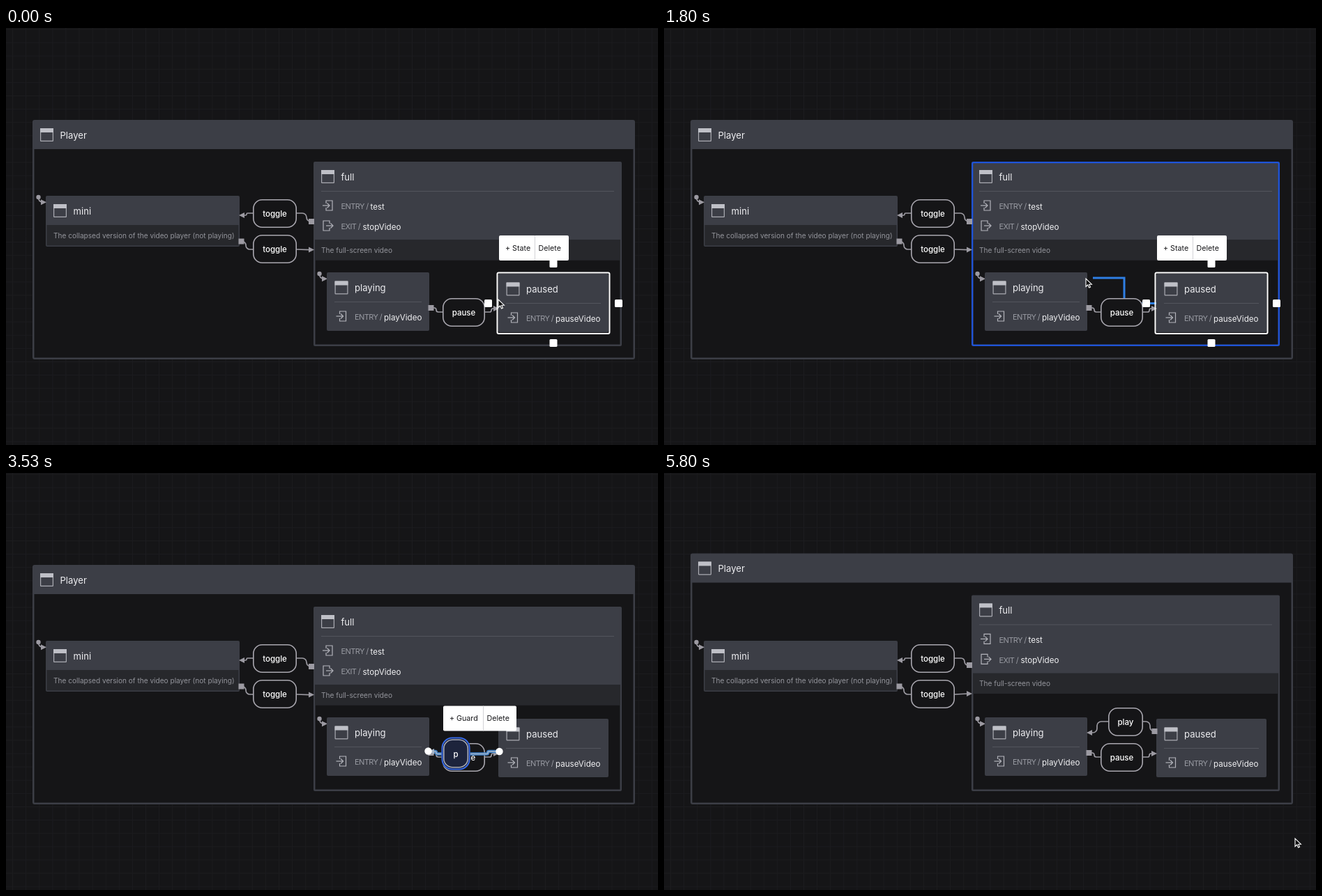
Recreate the animation shown at these times as an HTML page with a canvas. Size 935 by 599 pixels, loop 5.87 s.

```html
<!DOCTYPE html>
<html lang="en">
<head>
<meta charset="utf-8">
<title>State chart editor</title>
<style>
html, body { margin: 0; width: 100%; height: 100%; overflow: hidden; background: #151517; }
canvas { display: block; }
</style>
</head>
<body>
<canvas id="stage" width="935" height="599"></canvas>
<script>
const ctx = document.getElementById('stage').getContext('2d');
const LOOP = 5870, STEP = 200 / 3;
const DARK = '#151517', PANEL = '#3c3e46', NOTE = '#27282c', RULE = '#53555d',
      EDGE = '#9c9aa2', BLUE = '#1e53d8', DRAG = '#2f7fe4', WHITE = '#fff';

// Pointer tracks: [time, x, y]; the pointer is hidden between tracks.
const tracks = [
  [[0, 706, 390], [70, 706, 390], [270, 722, 406], [600, 689, 392], [1270, 689, 392],
   [1330, 678, 379], [1470, 655, 364], [1730, 615, 359], [1800, 605, 360], [1870, 602, 361],
   [2130, 601, 372], [3010, 601, 372], [3200, 655, 345], [3470, 769, 314], [3529, 769, 314]],
  [[3730, 785, 400], [3930, 841, 502], [4199, 841, 502]],
  [[5670, 930, 460], [5730, 917, 497], [5800, 905, 525], [5870, 905, 525]]
];

function pointerAt(t) {
  for (const track of tracks) {
    for (let i = 1; i < track.length; i++) {
      const [t0, x0, y0] = track[i - 1], [t1, x1, y1] = track[i];
      if (t >= t0 && t <= t1) {
        const k = (t - t0) / (t1 - t0);
        return [x0 + (x1 - x0) * k, y0 + (y1 - y0) * k];
      }
    }
  }
  return null;
}

function text(str, x, mid, size, color, { weight = 400, align = 'left', spacing = 0 } = {}) {
  ctx.font = `${weight} ${size}px Inter, sans-serif`;
  ctx.letterSpacing = spacing + 'px';
  ctx.textAlign = align;
  ctx.fillStyle = color;
  ctx.fillText(str, x, mid + size * 0.36);
}

function fillBox(x, y, w, h, color, r = 0) {
  ctx.fillStyle = color;
  ctx.beginPath();
  ctx.roundRect(x, y, w, h, r);
  ctx.fill();
}

function strokeBox(x, y, w, h, color, width, r = 2) {
  ctx.strokeStyle = color;
  ctx.lineWidth = width;
  ctx.beginPath();
  ctx.roundRect(x + width / 2, y + width / 2, w - width, h - width, r);
  ctx.stroke();
}

function line(points, color, width) {
  ctx.strokeStyle = color;
  ctx.lineWidth = width;
  ctx.beginPath();
  points.forEach(([x, y]) => ctx.lineTo(x, y));
  ctx.stroke();
}

function dot(x, y, r, color) {
  ctx.fillStyle = color;
  ctx.beginPath();
  ctx.arc(x, y, r, 0, 7);
  ctx.fill();
}

// Horizontal run, rounded step at column mx, horizontal run.
function elbow(x0, y0, mx, x1, y1, color = EDGE, width = 1.7) {
  const r = Math.min(6, Math.abs(y1 - y0) / 2);
  ctx.strokeStyle = color;
  ctx.lineWidth = width;
  ctx.beginPath();
  ctx.moveTo(x0, y0);
  ctx.arcTo(mx, y0, mx, y1, r);
  ctx.arcTo(mx, y1, x1, y1, r);
  ctx.lineTo(x1, y1);
  ctx.stroke();
}

function arrow(x, y, dir, color = EDGE) {
  ctx.fillStyle = color;
  ctx.beginPath();
  ctx.moveTo(x, y);
  ctx.lineTo(x - 8 * dir, y - 4);
  ctx.lineTo(x - 8 * dir, y + 4);
  ctx.fill();
}

const socket = (x, y) => fillBox(x - 4, y - 4, 8, 8, EDGE);

function initial(x, y) {
  dot(x, y, 3.2, EDGE);
  ctx.strokeStyle = EDGE;
  ctx.lineWidth = 1.7;
  ctx.beginPath();
  ctx.moveTo(x, y);
  ctx.quadraticCurveTo(x, y + 7, x + 6, y + 7);
  ctx.stroke();
  arrow(x + 11.5, y + 7.3, 1);
}

function title(name, x, mid) {
  strokeBox(x, mid - 9.5, 19, 19, '#aaabb2', 1.2, 0.5);
  fillBox(x, mid - 9.5, 19, 6, '#bfc0c7');
  text(name, x + 28.5, mid + 0.5, 13.1, '#ededf0');
}

function action(kind, name, x, mid) {
  const entry = kind === 'ENTRY', c = '#b3b4bb';
  const [a, b] = entry ? [5, 14] : [10, 1];
  const top = mid - 8, end = mid + 6;
  line([[x + a, top + 4], [x + a, top], [x + b, top], [x + b, end], [x + a, end], [x + a, end - 4]], c, 1.2);
  const from = entry ? 0 : 5, tip = from + 10;
  line([[x + from, mid - 1], [x + tip, mid - 1]], c, 1.2);
  line([[x + tip - 3.5, mid - 4.5], [x + tip, mid - 1], [x + tip - 3.5, mid + 2.5]], c, 1.2);
  text(kind + ' /', x + 26.5, mid + 0.5, 11, '#989aa2', { spacing: -0.6 });
  text(name, x + (entry ? 68.5 : 57.5), mid + 0.5, 11.6, '#f0f0f2');
}

function leaf(name, x, y, w, method) {
  fillBox(x, y, w, 84, PANEL, 2);
  title(name, x + 11.5, y + 22);
  line([[x + 11, y + 42.5], [x + w - 11, y + 42.5]], RULE, 1);
  action('ENTRY', method, x + 13.5, y + 64);
}

function pill(label, x, y, w) {
  fillBox(x, y, w, 41, DARK, 13);
  strokeBox(x, y, w, 41, '#a9a7af', 1.6, 12.5);
  text(label, x + w / 2, y + 21, 11.5, WHITE, { weight: 500, align: 'center' });
}

function menu(first, x, y, w, split, alpha = 1) {
  ctx.globalAlpha = alpha;
  fillBox(x, y, w, 36, WHITE, 2);
  line([[x + split, y], [x + split, y + 36]], '#d3d3d6', 1);
  text(first, x + 9, y + 18, 10.7, '#18181b');
  text('Delete', x + split + 5, y + 18, 10.7, '#18181b');
  ctx.globalAlpha = 1;
}

function drawGrid() {
  fillBox(0, 0, 935, 599, DARK);
  for (let i = 0; i < 50; i++) {
    const x = 9.5 + i * 19.1, y = 2 + i * 19.1;
    line([[x, 0], [x, 599]], '#1c1c1f', 1);
    line([[0, y], [935, y]], '#1c1c1f', 1);
  }
}

function drawParents(lift, highlight) {
  const top = 132 - lift, fullTop = 192 - lift;
  fillBox(38, top, 864, 476 - top, PANEL, 3);
  fillBox(40.5, top + 42, 859, 431.5 - top, DARK);
  title('Player', 49, top + 21.5);

  fillBox(57, 241, 278, 73, PANEL, 2);
  fillBox(58.5, 283, 275, 29.5, NOTE);
  title('mini', 68, 262.5);
  text('The collapsed version of the video player (not playing)', 68, 298, 10.1, '#94959c');
  initial(46.5, 243);

  fillBox(441, fullTop, 442, 457 - fullTop, PANEL, 2);
  fillBox(443, fullTop + 112, 438, 29.5, NOTE);
  fillBox(443.5, fullTop + 141.5, 437, 313 - fullTop, DARK);
  title('full', 452, fullTop + 21.5);
  line([[452, fullTop + 42.5], [872, fullTop + 42.5]], RULE, 1);
  action('ENTRY', 'test', 454, fullTop + 64);
  action('EXIT', 'stopVideo', 454, fullTop + 93);
  text('The full-screen video', 452, fullTop + 127, 10.1, '#94959c');
  if (highlight) strokeBox(441, fullTop, 442, 457 - fullTop, BLUE, 2.3);

  const out = lift ? 276 : 278, into = lift ? 317 : 318.6;
  elbow(438, out, 431, 417, 266);
  elbow(354, 266, 345, 340, 269);
  socket(438, out);
  arrow(334, 269, -1);
  elbow(337.5, 306.5, 344, 354, 318);
  line([[417, 318], [436, into]], EDGE, 1.7);
  socket(337.5, 306.5);
  arrow(442, into, 1);
  pill('toggle', 354, 246, 63);
  pill('toggle', 354, 297, 63);
}

function drawPauseEdge() {
  elbow(609.5, 402, 617, 626, 408);
  elbow(687, 408, 696, 701, 403);
  socket(609.5, 402);
  arrow(707, 403, 1);
  pill('pause', 626, 388, 61);
}

function drawPlayEdge() {
  elbow(703.5, 371, 697, 687, 357);
  elbow(637, 357, 621, 612, 373);
  socket(703.5, 371);
  arrow(606, 373, -1);
  pill('play', 637, 337, 50);
}

function drawSelectedState() {
  strokeBox(703.5, 350.5, 163, 89.5, WHITE, 2);
  for (const [x, y] of [[785, 338.5], [878.5, 395.5], [785, 452.5], [691.5, 395.5]])
    fillBox(x - 5.5, y - 5.5, 11, 11, WHITE, 1.5);
  menu('+ State', 707, 298, 100, 51.5);
}

function drawNewEvent(t) {
  const typed = t < 3530 ? 'Event 2' : 'play'.slice(0, t < 3600 ? 1 : t < 3670 ? 2 : t < 3800 ? 3 : 4);
  const selected = t < 4000;
  ctx.font = '500 11.5px Inter, sans-serif';
  ctx.letterSpacing = '0px';
  const w = ctx.measureText(typed).width + 29, right = 627 + w;
  const bend = Math.max(691, right + 3);
  const passes = selected ? [['#3e7fc4', 4.5], ['#a7b6c8', 1.5]] : [[EDGE, 1.7]];
  for (const [color, width] of passes) {
    elbow(right, 403.5, bend, 707, 400, color, width);
    elbow(627, 403.5, 617, 611, 400, color, width);
  }
  arrow(606, 400, -1, selected ? '#a7b6c8' : EDGE);
  if (!selected) {
    socket(703.5, 400);
    pill(typed, 627, 383, w);
    return;
  }
  fillBox(624.5, 379.5, w + 5, 47, DARK, 15);
  strokeBox(624.5, 379.5, w + 5, 47, '#386be8', 2, 14.5);
  fillBox(627, 382.5, w, 41, '#1d243c', 13);
  strokeBox(627, 382.5, w, 41, '#a9acb9', 1.6, 12.5);
  text(typed, 627 + w / 2, 404, 11.5, WHITE, { weight: 500, align: 'center' });
  dot(605.5, 399.5, 5.2, WHITE);
  dot(707.5, 400, 5.2, WHITE);
  menu('+ Guard', 627, 334.5, 105, 57.5, Math.min(1, 0.4 + (t - 2670) / 430));
}

function drawPointer([x, y]) {
  ctx.beginPath();
  for (const [dx, dy] of [[0, 0], [0, 11.5], [2.7, 9], [4.6, 13], [6.5, 12.2], [4.7, 8.2], [8.4, 8.2]])
    ctx.lineTo(x + dx, y + dy);
  ctx.closePath();
  ctx.fillStyle = '#0b0b0c';
  ctx.fill();
  ctx.strokeStyle = WHITE;
  ctx.lineWidth = 1.1;
  ctx.stroke();
}

function draw(t) {
  const dragging = t >= 1330 && t < 2670;
  const done = t >= 4200;
  drawGrid();
  drawParents(done ? 16.6 : 0, t >= 1330 && t < 1870);
  initial(449.5, 353);

  if (dragging) {
    // The loose end trails the pointer by one step.
    const [x, y] = pointerAt(t - 70), mid = (x + 705) / 2;
    line([[x, y], [mid, y], [mid, 395.5], [706, 395.5]], DRAG, 3);
  }
  leaf('playing', 460, 351, 147, 'playVideo');
  if (t >= 1870 && t < 2670) strokeBox(460, 351, 147, 84, BLUE, 2.3);
  leaf('paused', 706, 353, 158, 'pauseVideo');
  drawPauseEdge();

  if (t < 2670) drawSelectedState();
  else if (!done) drawNewEvent(t);
  else drawPlayEdge();

  const pointer = pointerAt(t);
  if (pointer) drawPointer(pointer);
}

function tick(now) {
  const step = Math.floor((now % LOOP + 4) / STEP);
  draw(Math.min(LOOP - 1, Math.round(step * STEP / 10) * 10));
  requestAnimationFrame(tick);
}
requestAnimationFrame(tick);
</script>
</body>
</html>
```
